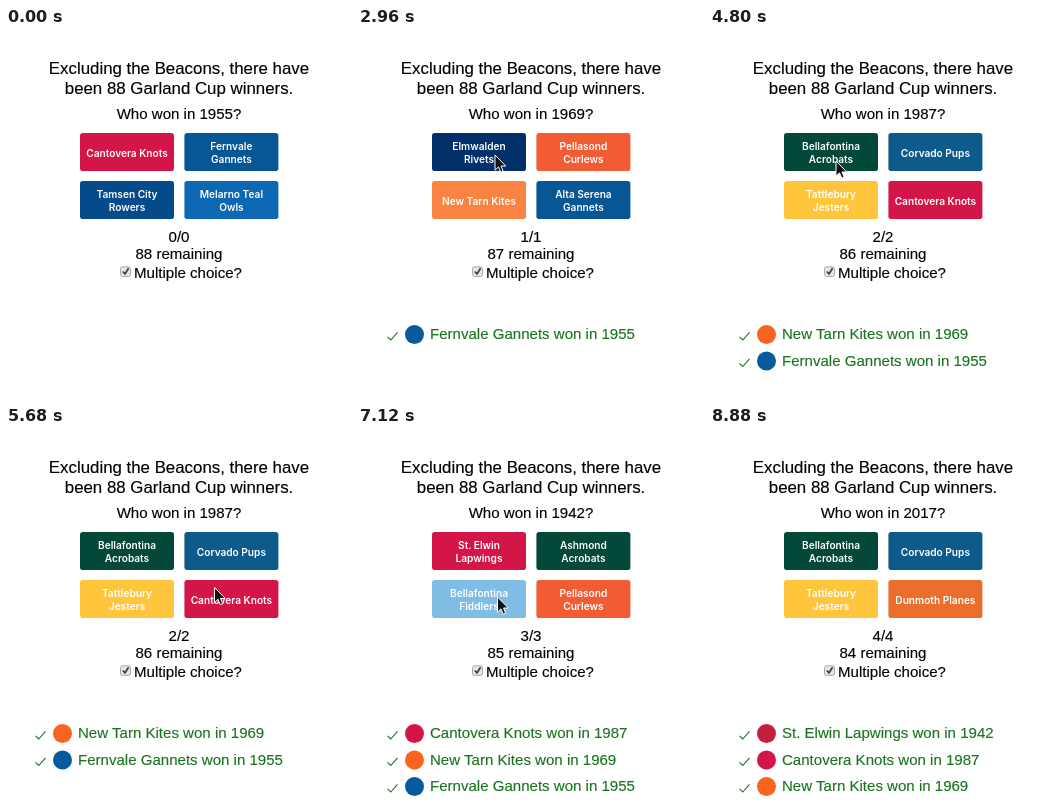
An HTML page that plays this animation: 346 by 371 pixels, repeating every 9680 ms.

```html
<!DOCTYPE html>
<html lang="en">
<head>
<meta charset="utf-8">
<title>Winners quiz</title>
<style>
  html, body { margin: 0; width: 100%; height: 100%; overflow: hidden; background: #fff; }
  svg { display: block; width: 346px; height: 371px; }
  text { font-family: "Liberation Sans", Arial, sans-serif; font-size: 15.05px; stroke: #000; stroke-width: .15px; }
  .title { font-size: 16.85px; }
  .mid { text-anchor: middle; }
  .label { font: 600 10.15px Inter, sans-serif; fill: #fff; stroke: none; text-anchor: middle; }
  .win { fill: #1a741f; stroke: #1a741f; }
  .tick { fill: none; stroke: #1a741f; stroke-width: 1.1; }
</style>
</head>
<body>
<svg id="stage" viewBox="0 0 346 371"></svg>
<script>
const LOOP = 9680, STEP = 80;
const stage = document.getElementById('stage');

// name (| marks a line break), button colour
const teams = {
  knots: ['Cantovera Knots', '#d31548'],
  gannets: ['Fernvale|Gannets', '#075796'],
  rowers: ['Tamsen City|Rowers', '#054b8b'],
  owls: ['Melarno Teal|Owls', '#0c68b2'],
  rivets: ['Elmwalden|Rivets', '#032f6b'],
  curlews: ['Pellasond|Curlews', '#f25c33'],
  kites: ['New Tarn Kites', '#f98340'],
  westGannets: ['Alta Serena|Gannets', '#075796'],
  acrobats: ['Bellafontina|Acrobats', '#04483a'],
  pups: ['Corvado Pups', '#0e5a8b'],
  jesters: ['Tattlebury|Jesters', '#fec53d'],
  lapwings: ['St. Elwin|Lapwings', '#d31548'],
  ashAcrobats: ['Ashmond|Acrobats', '#04483a'],
  fiddlers: ['Bellafontina|Fiddlers', '#80bde5'],
  planes: ['Dunmoth Planes', '#eb6e2d']
};

// start time, year, choices, correct choice, badge colour
const rounds = [
  [0, 1955, ['knots', 'gannets', 'rowers', 'owls'], 'gannets', '#075a9e'],
  [1840, 1969, ['rivets', 'curlews', 'kites', 'westGannets'], 'kites', '#f8641f'],
  [3920, 1987, ['acrobats', 'pups', 'jesters', 'knots'], 'knots', '#d31548'],
  [6080, 1942, ['lapwings', 'ashAcrobats', 'fiddlers', 'curlews'], 'lapwings', '#c41e3a'],
  [8000, 2017, ['acrobats', 'pups', 'jesters', 'planes'], 'planes', '#eb6e2d']
];

// pointer moves: first step, arrival, destination
const moves = [
  [560, 1520, 232, 122],
  [2560, 2960, 137, 127],
  [3280, 3680, 134, 169],
  [4560, 4800, 126, 133],
  [5120, 5440, 207, 133],
  [5600, 5760, 209, 170],
  [6800, 7120, 139.5, 170],
  [7440, 7760, 130, 131]
];
const entry = [279, 299];

function add(parent, tag, attrs, text) {
  const el = document.createElementNS('http://www.w3.org/2000/svg', tag);
  for (const k in attrs) el.setAttribute(k, attrs[k]);
  if (text !== undefined) el.textContent = text;
  parent.appendChild(el);
  return el;
}

const mid = (parent, y, text, cls = 'mid') => add(parent, 'text', { x: 173, y, class: cls }, text);

function button(parent, key, i) {
  const [name, fill] = teams[key];
  const x = 74 + (i % 2) * 104.4, y = 105 + (i >> 1) * 48;
  add(parent, 'rect', { x, y, width: 94, height: 38, rx: 2.8, fill });
  const lines = name.split('|');
  lines.forEach((line, n) => add(parent, 'text', {
    x: x + 47, y: y + 23.7 + (n - (lines.length - 1) / 2) * 12.9, class: 'label'
  }, line));
}

function result(parent, [, year, , key, fill], row) {
  const g = add(parent, 'g', { transform: `translate(0 ${row * 26.5})` });
  add(g, 'path', { d: 'M29.5 308.8L32.8 312L39.5 304.3', class: 'tick' });
  add(g, 'circle', { cx: 56.5, cy: 306.5, r: 9.5, fill });
  add(g, 'text', { x: 72, y: 311, class: 'win' }, `${teams[key][0].replace('|', ' ')} won in ${year}`);
}

mid(stage, 45.6, 'Excluding the Beacons, there have', 'mid title');
mid(stage, 65.6, 'been 88 Garland Cup winners.', 'mid title');
add(stage, 'rect', { x: 114.5, y: 238.8, width: 10, height: 9.6, rx: 2, fill: '#e6e6e6', stroke: '#a8a8a8' });
add(stage, 'path', { d: 'M116.8 243.5L119 245.9L122.6 240.3', fill: 'none', stroke: '#404040', 'stroke-width': 1.8 });
add(stage, 'text', { x: 128, y: 249.8 }, 'Multiple choice?');

const screens = rounds.map(([, year, choices], n) => {
  const g = add(stage, 'g', {});
  mid(g, 91, `Who won in ${year}?`);
  choices.forEach((key, i) => button(g, key, i));
  mid(g, 214, `${n}/${n}`);
  mid(g, 231, `${88 - n} remaining`);
  rounds.slice(0, n).reverse().forEach((round, row) => result(g, round, row));
  return g;
});

const pointer = add(stage, 'path', {
  d: 'M0 0V15.2L3.5 11.9L5.8 17.2L8.2 16.2L6 11H10.8Z',
  fill: '#111', stroke: '#fff', 'stroke-width': 1, 'stroke-linejoin': 'round'
});

const clamp = v => Math.max(0, Math.min(1, v));
const ease = p => p * p * (3 - 2 * p);

function pointerAt(t) {
  let [x, y] = entry;
  moves.forEach(([from, to, tx, ty], i) => {
    const p = ease(clamp((t - from + STEP) / (to - from + STEP)));
    const bow = i ? 0 : -28 * Math.sin(Math.PI * p);
    x += (tx - x) * p + bow;
    y += (ty - y) * p;
  });
  return [x, y];
}

function draw(now) {
  const t = Math.floor((now % LOOP) / STEP) * STEP;
  const current = rounds.filter(r => r[0] <= t).length - 1;
  screens.forEach((g, i) => g.setAttribute('display', i === current ? 'inline' : 'none'));
  const [x, y] = pointerAt(t);
  pointer.setAttribute('transform', `translate(${x.toFixed(2)} ${y.toFixed(2)})`);
  pointer.setAttribute('opacity', clamp((t - 480) / 240) * clamp((8880 - t) / 400));
}

const start = performance.now();
function tick() {
  draw(performance.now() - start);
  requestAnimationFrame(tick);
}
tick();
</script>
</body>
</html>
```
